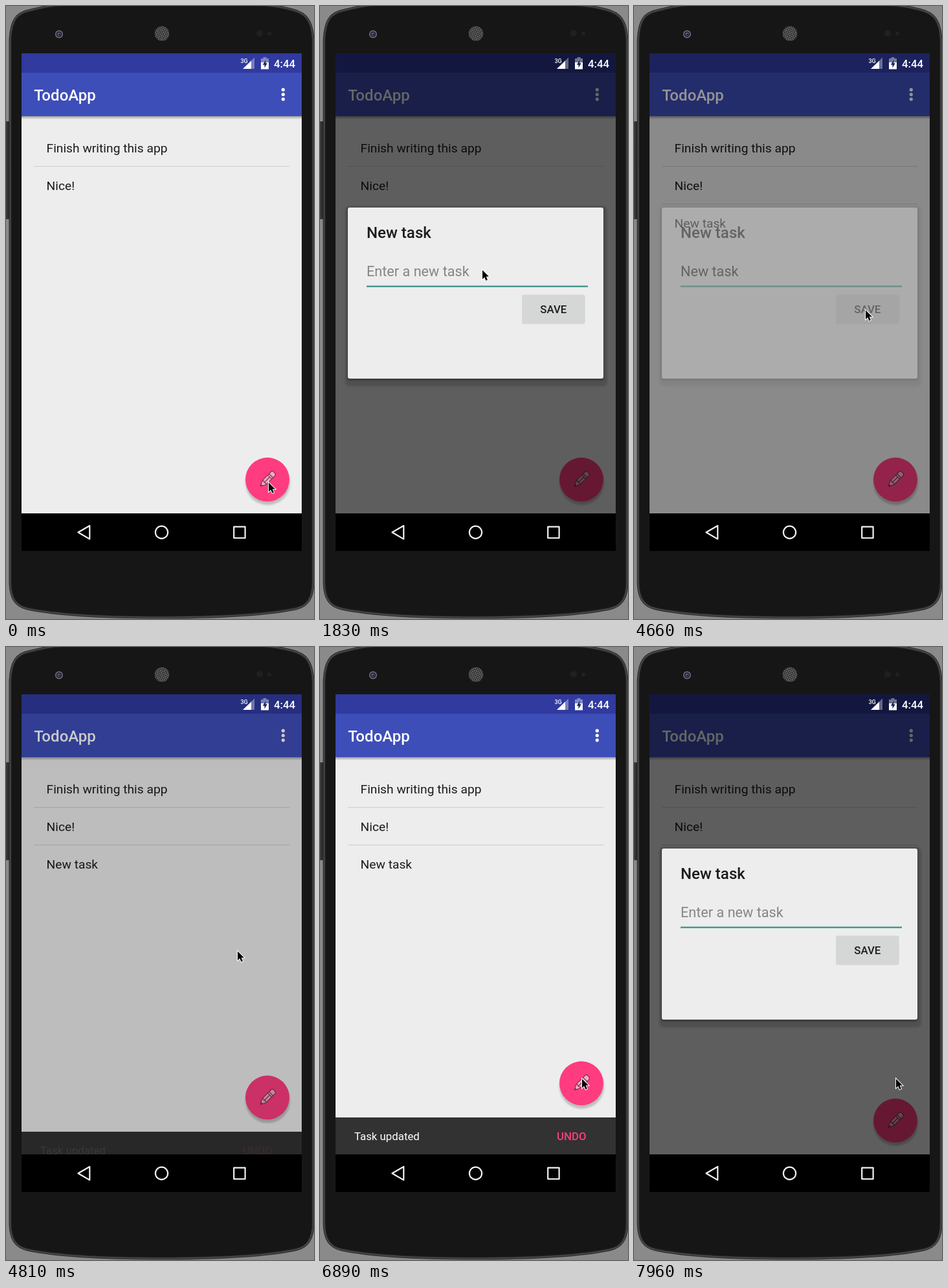
These frames come from a looping animation (476x946 px, 8000 ms). An HTML page:

```html
<!DOCTYPE html>
<html lang="en">
<head>
<meta charset="utf-8">
<title>Todo list demo</title>
<style>
  html, body { margin: 0; width: 100%; height: 100%; overflow: hidden; background: #8a8a8a; }
  svg { display: block; width: 100vw; height: 100vh; }
  text { font-family: Roboto, sans-serif; font-size: 19.24px; fill: #1c1c1c; white-space: pre; }
  .bold { font-weight: 500; }
  .title { font-size: 24.05px; font-weight: 500; }
  .input { font-size: 21.65px; }
  .small { font-size: 16.84px; }
  .white { fill: #fff; }
  .line { stroke: #cdcdcd; stroke-width: 1; }
  .nav { fill: none; stroke: #f2f2f2; stroke-width: 2.2; stroke-linejoin: round; }
</style>
</head>
<body>
<svg viewBox="0 0 476 946">
  <defs>
    <clipPath id="screen"><path d="M24 73H457V783H24Z"/></clipPath>
    <filter id="soft" x="-20%" y="-20%" width="140%" height="140%"><feGaussianBlur stdDeviation="1.6"/></filter>
    <linearGradient id="fade" x2="0" y2="1">
      <stop stop-color="#000" stop-opacity=".34"/>
      <stop offset="1" stop-color="#000" stop-opacity="0"/>
    </linearGradient>
    <linearGradient id="key">
      <stop stop-color="#4c4c4c"/>
      <stop offset="1" stop-color="#1f1f1f"/>
    </linearGradient>
    <pattern id="mesh" width="4" height="4" patternUnits="userSpaceOnUse" patternTransform="rotate(20)">
      <circle cx="1" cy="1" r="1.1" fill="#777"/>
      <circle cx="3" cy="3" r="1.1" fill="#777"/>
    </pattern>
  </defs>

  <!-- phone body -->
  <rect width="476" height="946" fill="#8a8a8a"/>
  <rect x="-3" y="178" width="9" height="151" rx="2" fill="url(#key)"/>
  <path d="M6.5 52C8 22 16 11 36 7C60 1 80-3 120-4H360C400-3 425 1 443 6C463 11 473 22 474.500 52V890C474 914 466 926 448 930C400 940 320 943.500 240 943.500S80 940 33 930C15 926 7 914 6.500 890Z"
    fill="#161616" stroke="#2b2b2b" stroke-width="4"/>
  <path d="M6.5 52C8 22 16 11 36 7C60 1 80-3 120-4H360C400-3 425 1 443 6C463 11 473 22 474.500 52V890C474 914 466 926 448 930C400 940 320 943.500 240 943.500S80 940 33 930C15 926 7 914 6.500 890Z"
    fill="none" stroke="#4b4b4b" stroke-width="1.500"/>
  <circle cx="82" cy="43.500" r="6" fill="#74747c"/>
  <circle cx="82" cy="43.500" r="4.600" fill="#282838"/>
  <circle cx="82" cy="43.500" r="2.400" fill="#5c5c86"/>
  <circle cx="82.500" cy="44" r="1.200" fill="#15151f"/>
  <circle cx="241" cy="42.500" r="11.500" fill="#242424"/>
  <circle cx="241" cy="42.500" r="11.200" fill="url(#mesh)"/>
  <circle cx="392" cy="42" r="5" fill="#202020"/>
  <circle cx="407" cy="42.500" r="3" fill="#212121"/>

  <!-- app -->
  <g clip-path="url(#screen)">
    <rect x="24" y="73" width="433" height="710" fill="#ededed"/>
    <rect x="24" y="170" width="433" height="5" fill="url(#fade)"/>
    <rect x="24" y="73" width="433" height="30.500" fill="#303a9f"/>
    <rect x="24" y="103" width="433" height="67" fill="#3e4eb8"/>
    <text class="title white" x="43.200" y="146">TodoApp</text>
    <g class="white">
      <circle cx="428.300" cy="129.200" r="2.600"/>
      <circle cx="428.300" cy="136.500" r="2.600"/>
      <circle cx="428.300" cy="143.800" r="2.600"/>
    </g>
    <text x="62.500" y="225.500">Finish writing this app</text>
    <path class="line" d="M43 247.500H438"/>
    <text x="62.500" y="283.700">Nice!</text>
    <g id="added">
      <path class="line" d="M43 305.500H438"/>
      <text x="62.500" y="342">New task</text>
    </g>

    <g id="fab">
      <circle cx="404.500" cy="735.500" r="34.500" opacity=".2" filter="url(#soft)"/>
      <circle cx="404" cy="730.800" r="34" fill="#ff3c80"/>
      <g transform="translate(404 730.500) rotate(-45)" fill="#f9a9c3" stroke="#83325a" stroke-width="1.200" stroke-linejoin="round">
        <path d="M-15 0L-7-4.300H8V4.300H-7Z"/>
        <path d="M8-4.300H12Q15-4.300 15-1.500V1.500Q15 4.300 12 4.300H8Z"/>
        <path d="M-7-4.300Q-5-2-7 0Q-5 2-7 4.300M-6 0H5M5-4.300V4.300" fill="none"/>
        <path d="M-15 0L-12.500-1.400V1.400Z" fill="#83325a"/>
      </g>
    </g>
    <g id="snack">
      <rect x="24" y="726" width="433" height="58" fill="#323232"/>
      <g id="snackText">
        <text class="small white" x="52.900" y="761">Task updated</text>
        <text class="small bold" x="366" y="761" style="fill:#ff3c80">UNDO</text>
      </g>
    </g>
    <rect id="dim" x="24" y="73" width="433" height="710"/>

    <!-- status icons -->
    <text class="bold white" x="362.500" y="87.500" style="font-size:9px">3G</text>
    <path d="M366 97L384 79.500V97Z" fill="#fff" opacity=".35"/>
    <path class="white" d="M366 97L379 84.400V97Z"/>
    <path d="M397.500 79H402.500V81H406V88H394V81H397.500Z" fill="#fff" opacity=".4"/>
    <path class="white" d="M394 87H406V97.500H394Z"/>
    <path d="M401.500 83L396.800 90.800H399.500V95.500L403.800 88.300H401.200Z" fill="#1a2160"/>
    <text class="small bold white" x="414" y="95">4:44</text>

    <g id="dialog">
      <rect x="39" y="309" width="405" height="278" rx="7" opacity=".14" filter="url(#soft)"/>
      <rect x="42" y="311" width="397" height="267" rx="4" opacity=".25" filter="url(#soft)"/>
      <rect x="43" y="311" width="395" height="264" rx="3" fill="#ededed"/>
      <text class="title" x="72" y="358">New task</text>
      <text class="input" id="hint" x="72" y="417" style="fill:#858585">Enter a new task</text>
      <text class="input" id="typed" x="72" y="417" xml:space="preserve"></text>
      <rect id="caret" x="72" y="394" width="2.200" height="29.500" fill="#159a8c"/>
      <rect x="72" y="431.500" width="342" height="2.400" fill="#44968b"/>
      <rect x="312" y="447" width="97.500" height="43.800" rx="3" opacity=".1"/>
      <rect x="312" y="445.500" width="97.500" height="44.500" rx="3" fill="#d5d7d6"/>
      <text class="small bold" x="360.800" y="474" text-anchor="middle">SAVE</text>
    </g>
  </g>

  <!-- navigation bar -->
  <rect x="24" y="783" width="433" height="58"/>
  <path class="nav" d="M111.500 812.300L129.300 802V822.600Z"/>
  <circle class="nav" cx="240.500" cy="812.300" r="9.600"/>
  <rect class="nav" x="352.200" y="803.600" width="17.400" height="17.400"/>

  <path id="mouse" d="M0 0V14L3.200 11L5.500 16.300L7.900 15.300L5.700 10.100H10Z" stroke="#fff" stroke-width="2" paint-order="stroke"/>
</svg>
<script>
  const LOOP = 8000, TASK = 'New task', SNACK = 57.5;
  const $ = id => document.getElementById(id);
  const [added, fab, snack, snackText, dim, dialog, hint, typed, caret, mouse] =
    ['added', 'fab', 'snack', 'snackText', 'dim', 'dialog', 'hint', 'typed', 'caret', 'mouse'].map($);

  // Progress 0..1 in n equal jumps, the first at `from`, the last at `to`.
  const jumps = (t, from, to, n) =>
    t < from ? 0 : Math.min(n, Math.floor((t - from) / (to - from) * (n - 1) + 1.02)) / n;
  const ease = p => p * p * (3 - 2 * p);
  // Value of the last [time, value] pair already reached.
  const held = (t, pairs) => pairs.reduce((v, [at, next]) => t >= at ? next : v, 0);
  const show = (el, on) => el.setAttribute('opacity', Number(on));
  const move = (el, x, y) => el.setAttribute('transform', `translate(${x} ${y})`);

  const moves = [
    { from: 1230, to: 1830, n: 5, x: 251, y: 407.5 },
    { from: 3910, to: 4360, n: 4, x: 358, y: 469.5, bump: 9 },
    { from: 6150, to: 6890, n: 6, x: 405, y: 666.5 }
  ];

  function pointer(t) {
    let x = 406, y = 735.5;
    for (const m of moves) {
      const p = jumps(t, m.from, m.to, m.n), e = ease(p);
      x += (m.x - x) * e;
      y += (m.y - y) * e + (m.bump || 0) * Math.sin(Math.PI * p);
    }
    return [x, y];
  }

  function draw(t) {
    show(dim, held(t, [[300, .4], [450, .6], [4660, .42], [4810, .205], [4950, 0], [7340, .4], [7490, .6]]));
    show(dialog, held(t, [[300, .97], [450, 1], [4660, .35], [4810, 0], [7340, .97], [7490, 1]]));
    show(added, t >= 4660);

    const rise = held(t, [[4810, .617], [4950, 1], [7810, .5], [7960, 0]]) * SNACK;
    move(fab, 0, -rise);
    move(snack, 0, SNACK - rise);
    show(snack, rise > 0);
    show(snackText, held(t, [[4810, .1], [4950, 1], [7810, .4]]));

    const count = t < 4810 ? 4 * jumps(t, 2270, 2720, 4) + 4 * jumps(t, 3170, 3620, 4) : 0;
    typed.textContent = TASK.slice(0, Math.round(count));
    show(hint, count === 0);
    caret.setAttribute('x', 72 + (count ? typed.getComputedTextLength() - .5 : 0));
    show(caret, held(t, [[300, 1], [780, 0], [1230, 1], [1830, 0], [2270, 1], [4210, 0], [7340, 1], [7810, 0]]));

    move(mouse, ...pointer(t));
  }

  let start;
  function tick(now) {
    start ??= now;
    draw((now - start) % LOOP);
    requestAnimationFrame(tick);
  }
  draw(0);
  requestAnimationFrame(tick);
</script>
</body>
</html>
```
